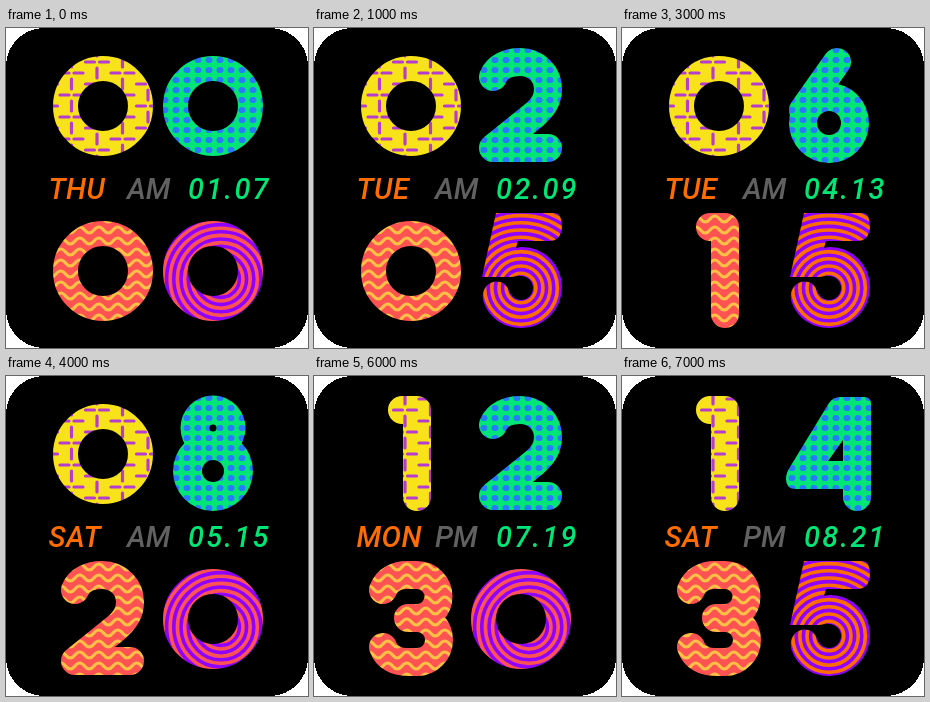
Write an HTML page that moves like this. It is 302 px wide and 320 px high and loops after 8000 ms.

```html
<!DOCTYPE html>
<html lang="en">
<head>
<meta charset="utf-8">
<title>Patterned digit clock</title>
<style>
  html, body { margin: 0; width: 100%; height: 100%; overflow: hidden; background: #fff; }
  svg { display: block; width: 302px; height: 320px; }
  text { font: italic 500 29px Roboto, Inter, sans-serif; }
  .stroke { fill: none; stroke: #fff; stroke-width: 28; stroke-linecap: round; stroke-linejoin: round; }
  .lines { fill: none; stroke-linecap: round; stroke-width: 3.2; }
</style>
</head>
<body>
<svg viewBox="0 0 302 320">
  <defs>
    <g id="d0"><circle r="37.5" fill="none" stroke="#fff" stroke-width="25"/></g>
    <g id="d1"><path class="stroke" d="M-9-44H6V43"/></g>
    <g id="d2"><path class="stroke" d="M-28-29C-24-39-13-44-1-44C16-44 27-31 27-17C27-6 22 1 13 9L-28 42H27"/></g>
    <g id="d3"><path class="stroke" d="M-28-29C-24-40-14-44-4-44H6a21.5 21.5 0 0 1 0 43H-3M6-1a22 22 0 0 1 0 44H-4C-14 43-24 39-28 28"/></g>
    <g id="d4"><path fill="#fff" fill-rule="evenodd" d="M11-57H35Q42-57 42-50V43a14 14 0 0 1-28 0V35H-33Q-43 35-43 25Q-43 19-39 13L0-51Q4-57 11-57ZM14-14V7H-1Z"/></g>
    <g id="d5"><path fill="#fff" d="M-25-58H34Q41-57 41-44Q40-30 28-30H-3L-5-23Q-2-24 1-24A40 40 0 0 1 41 16A41 41 0 0 1 0 57C-18 57-33 46-38 29C-41 9-17 4-12 20C-9 27-4 29 0 29A12 12 0 0 0 12 17A12 12 0 0 0 0 5C-5 4-6 6-10 6H-39Z"/></g>
    <g id="d6" fill="#fff"><circle cy="17" r="40"/><path class="stroke" d="M-26 4L8-44"/><circle cy="17" r="12" fill="#000"/></g>
    <g id="d8" fill="#fff"><circle cy="-26" r="32.5"/><circle cy="17" r="40"/><circle cy="-26" r="3.5" fill="#000"/><circle cy="17" r="11" fill="#000"/></g>
  </defs>
  <rect width="302" height="320" rx="38" shape-rendering="crispEdges"/>
  <g id="slots"></g>
  <text id="day" x="42.5" y="171" fill="#ff6d00" letter-spacing=".5"></text>
  <text id="half" x="121" y="171" fill="#616161"></text>
  <text id="date" x="182" y="171" fill="#00e676" letter-spacing="2.2"></text>
</svg>
<script>
const $ = id => document.getElementById(id);

// Repeats fn(x, y) every dx, dy across one digit, passing through (x0, y0)
function grid(x0, y0, dx, dy, fn) {
  let out = '';
  for (let j = -7; j <= 7; j++) {
    for (let i = -7; i <= 7; i++) out += fn(x0 + i * dx, y0 + j * dy);
  }
  return out;
}

const lines = (d, color) => `<path class="lines" stroke="${color}" d="${d}"/>`;

// One upright dash between two flat ones, laid like bricks
function dashes() {
  const trio = (x, y) => `M${x} ${y - 5}v10M${x - 23} ${y}h9M${x + 14} ${y}h9`;
  const d = grid(-6, 11, 51, 22, trio) + grid(19.5, 0, 51, 22, trio);
  return lines(d, '#b63ccf');
}

function dots() {
  return grid(7, 4, 11, 10, (x, y) =>
    `<ellipse cx="${x}" cy="${y}" rx="3.5" ry="3.1" fill="#2979ff"/>`);
}

function waves() {
  let d = '';
  for (let y = -63; y < 64; y += 11) {
    d += `M-66 ${y}q4.75-6 9.5 0` + 't9.5 0'.repeat(13);
  }
  return lines(d, '#ffc046');
}

function rings() {
  let out = '';
  for (let r = 4; r < 100; r += 7.2) {
    out += `<circle class="lines" r="${r}" stroke="#9000ff" style="stroke-width:3.6"/>`;
  }
  return `<g id="rings">${out}</g>`;
}

const slots = [
  [97, 78, '#f8e31b', dashes],
  [207, 78, '#00e676', dots],
  [97, 243, '#ff5252', waves],
  [207, 243, '#ff5252', rings],
];

$('slots').innerHTML = slots.map(([x, y, color, pattern], i) => `
  <g transform="translate(${x} ${y})">
    <mask id="m${i}" maskUnits="userSpaceOnUse" x="-60" y="-62" width="120" height="124">
      <use id="u${i}" href="#d0"/>
    </mask>
    <g mask="url(#m${i})">
      <rect id="b${i}" x="-60" y="-62" width="120" height="124" fill="${color}"/>${pattern()}
    </g>
  </g>`).join('');

const pad = n => String(n).padStart(2, '0');
const days = ['SUN', 'MON', 'TUE', 'WED', 'THU', 'FRI', 'SAT'];

function show(step) {
  const hour = step * 2, day = 7 + step * 2;
  const digits = pad(hour) + pad(step * 5);
  [...digits].forEach((n, i) => $('u' + i).setAttribute('href', '#d' + n));
  const five = digits[3] === '5';
  $('b3').setAttribute('fill', five ? '#ff6d00' : '#ff5252');
  $('rings').setAttribute('transform', five ? 'translate(0 17)' : 'translate(8 8)');
  $('day').textContent = days[new Date(2021, step, day).getDay()];
  $('half').textContent = hour < 12 ? 'AM' : 'PM';
  $('date').textContent = pad(step + 1) + '.' + pad(day);
}

let current = -1;
function tick() {
  const step = Math.floor(performance.now() / 1000) % 8;
  if (step !== current) show(current = step);
  requestAnimationFrame(tick);
}
tick();
</script>
</body>
</html>
```
